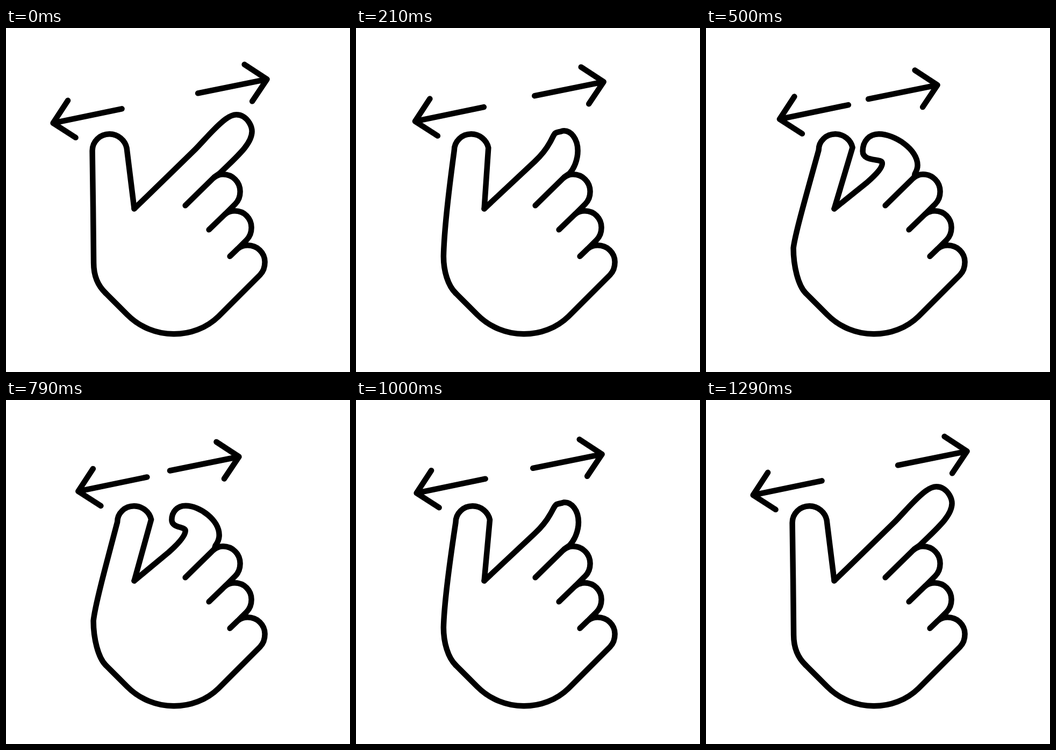
An HTML page for the animation above (1500 ms loop, 640 by 640 pixels).

```html
<!DOCTYPE html>
<html lang="en">
<head>
<meta charset="utf-8">
<title>Spread gesture</title>
<style>
  html, body { margin: 0; width: 100%; height: 100%; overflow: hidden; background: #fff; }
  svg { display: block; width: 100vw; height: 100vh; }
</style>
</head>
<body>
<svg viewBox="0.4 0.65 640 640" fill="none" stroke="#000" stroke-width="10.5" stroke-linecap="round" stroke-linejoin="round">
  <path id="left" d="M216 151L88 177.5M115.5 135.5L88 177.5L130 204.5"/>
  <path id="right" d="M357.5 122L486 96M444 68.5L486 96L458.5 137"/>
  <path d="M334 331L386 280C392 275 398 273 404 273C422 273 436 287 436 305C436 314 433 322 427 328L408 347"/>
  <path d="M378 376L408 347C414 342 420 341 426 341C444 341 457 355 457 372C457 381 454 389 448 395L434 409"/>
  <path d="M417 425.5L432 411C437 407 443 405 450 405C468 405 482 419 482 436C482 445 479 454 473 460L396 537C351 581 274 582 226 534L186 494"/>
  <path id="thumb"/>
  <path id="finger"/>
</svg>
<script>
const LOOP = 1500, STEPS = 21;

const thumbOpen = "M186 494C171 480 163.5 460 163.5 438C163 368 162 299 161 229C161 212 175 198 193 198C209 198 222 210 225 224L239 337";
const thumbClosed = "M186 494C172 480 163 444 163 410C166 385 185 318 210 228C210 211 224 198 241 198C257 198 270 209 273 223L239 337";

// Index finger from stretched to curled
const fingerPoses = [
  "M239 337L350 229C362 217 374 203 386 191C402 175 416 162 429 162C434 162 438 163 442 165.5C451 171 458 183 458 193C458 216 432 238 398 271L388 278",
  "M239 337L333 249C346 237 355 225 361 214C365 207 368 199 371 196.5C374 194 379 194.5 385 192C400 190 413 207 413 229C413 246 406 262 398 271L388 278",
  "M239 337L306 280C324 264 339 247 340 236C340 229 325 228 325 218C325 207 333 197 347 197C371 197 400 222 400 248C400 256 397 264 391 271L388 278",
  "M239 337L300 288C318 272 330 259 328 251C326 243 292 250 292 230C292 211 304 198 322 198C351 198 394 226 394 256C394 262 392 267 389 272L388 278"
];

// [step, value] pairs, linear in between
const closeTrack = [[0.22, 0], [6.37, 1], [10.65, 1], [17.456, 0]];
const curlTrack = [[0.22, 0], [3, 1], [7, 3], [10, 3], [14, 0.97], [17.4, 0]];

const byId = id => document.getElementById(id);
const lerp = (a, b, w) => a + (b - a) * w;

function sample(track, k) {
  const next = track.findIndex(([at]) => at > k);
  if (next === -1) return track[track.length - 1][1];
  if (next === 0) return track[0][1];
  const [k0, v0] = track[next - 1], [k1, v1] = track[next];
  return lerp(v0, v1, (k - k0) / (k1 - k0));
}

function morph(from, to, w) {
  const number = /[\d.]+/g, ends = to.match(number);
  let i = 0;
  return from.replace(number, n => lerp(+n, +ends[i++], w).toFixed(2));
}

function draw(ms) {
  const k = Math.floor((ms % LOOP + 5) * STEPS / LOOP) % STEPS;
  const close = sample(closeTrack, k), curl = sample(curlTrack, k);
  const pose = Math.min(2, Math.floor(curl));
  byId("left").setAttribute("transform", `translate(${49.3 * close} ${-7.3 * close})`);
  byId("right").setAttribute("transform", `translate(${-55 * close} ${10.7 * close})`);
  byId("thumb").setAttribute("d", morph(thumbOpen, thumbClosed, close));
  byId("finger").setAttribute("d", morph(fingerPoses[pose], fingerPoses[pose + 1], curl - pose));
}

const start = performance.now();
function tick() {
  draw(performance.now() - start);
  requestAnimationFrame(tick);
}
tick();
</script>
</body>
</html>
```
